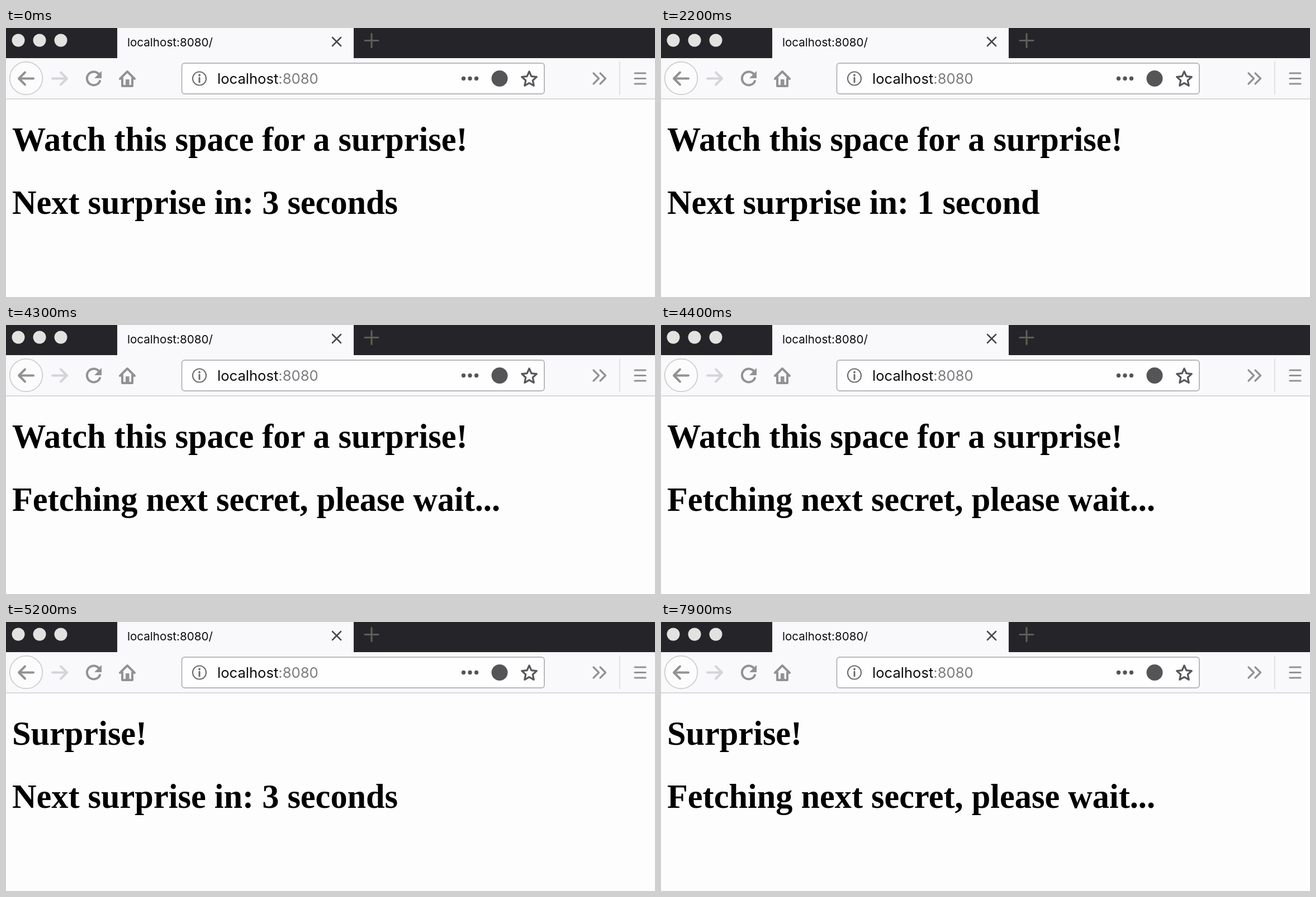
An HTML page for the animation above (8000 ms loop, 1161 px wide and 482 px high).

```html
<!DOCTYPE html>
<html lang="en">
<head>
<meta charset="utf-8">
<title>Surprise countdown</title>
<style>
  html, body { margin: 0; width: 100%; height: 100%; overflow: hidden; background: #fdfdfd; }
  svg { display: block; width: 100%; height: 100%; }
  .ui { font-family: Inter, sans-serif; fill: #0c0c0d; }
  .page { font: bold 60.3px "Liberation Serif", serif; fill: #000; }
  .icon { fill: none; stroke: #929294; stroke-width: 4; stroke-linecap: round; stroke-linejoin: round; }
</style>
</head>
<body>
<svg viewBox="0 0 1161 482">
  <rect width="1161" height="482" fill="#fdfdfd"/>

  <!-- Tab strip -->
  <rect width="1161" height="54" fill="#242429"/>
  <g fill="#e2e2e1">
    <circle cx="22" cy="22" r="11.5"/>
    <circle cx="60" cy="22" r="11.5"/>
    <circle cx="98" cy="22" r="11.5"/>
  </g>
  <rect x="199" width="423" height="54" fill="#f9f9fb"/>
  <rect id="burst" x="200" width="0" height="54" fill="#e5ecfb"/>
  <text class="ui" x="217" y="33" font-size="20.6">localhost:8080/</text>
  <path class="icon" d="M584 17l15 15m0-15l-15 15" style="stroke:#48484c;stroke-width:2.6"/>
  <path class="icon" d="M642 22.5h24M654 10.5v24" style="stroke:#5f5f59;stroke-width:3.2"/>

  <!-- Toolbar -->
  <rect y="54" width="1161" height="72" fill="#f9f9fb"/>
  <rect y="126" width="1161" height="2" fill="#d8d8dd"/>
  <circle cx="36" cy="90" r="29.3" fill="#fcfcfc" stroke="#c8c8c8" stroke-width="1.6"/>
  <path class="icon" d="M49 90.5H23m11-11L23 90.5l11 11"/>
  <path class="icon" d="M83 90.5h26m-11-11l11 11l-11 11" style="stroke:#d4d4d9"/>
  <path class="icon" d="M167 84A12 12 0 1 0 168 95"/>
  <path d="M171 77v13h-13z" fill="#929294"/>
  <path class="icon" d="M204 91l13-13l13 13M208 90v14h18V90"/>
  <rect x="214" y="92" width="6.5" height="10" fill="#929294"/>

  <!-- Address bar -->
  <rect x="314.5" y="63" width="648.5" height="55" rx="5" fill="#fefefe" stroke="#b9b9bd" stroke-width="2"/>
  <circle cx="346" cy="90.5" r="12" fill="none" stroke="#6c6c6e" stroke-width="2.2"/>
  <path d="M346 89v8" stroke="#6c6c6e" stroke-width="3" stroke-linecap="round"/>
  <circle cx="346" cy="84.5" r="1.9" fill="#6c6c6e"/>
  <text class="ui" x="378" y="100" font-size="25.6">localhost<tspan fill="#7c7c80">:8080</tspan></text>
  <g fill="#555558">
    <circle cx="818.5" cy="90.5" r="3.7"/>
    <circle cx="830" cy="90.5" r="3.7"/>
    <circle cx="841.5" cy="90.5" r="3.7"/>
    <circle cx="883" cy="90.5" r="14.5"/>
  </g>
  <path id="star" class="icon" style="stroke:#56565c;stroke-width:3.2"/>
  <path class="icon" d="M1051 81l9.5 9.5l-9.5 9.5m12-19l9.5 9.5l-9.5 9.5" style="stroke-width:3.2"/>
  <rect x="1097" y="60" width="1.6" height="60" fill="#dcdce0"/>
  <path class="icon" d="M1125 81h19m-19 9.5h19m-19 9.5h19" style="stroke-width:3.2"/>

  <!-- Page -->
  <text id="headline" class="page" x="11" y="219.5"></text>
  <text id="status" class="page" x="11" y="332.5"></text>
</svg>
<script>
const LOOP = 8000, STEP = 100, RELOAD = 4500;
const FETCHING = "Fetching next secret, please wait...";
const [burst, star, headline, status_] =
  ["burst", "star", "headline", "status"].map(id => document.getElementById(id));
const clamp = v => Math.max(0, Math.min(1, v));

const starPoints = Array.from({ length: 10 }, (_, i) => {
  const radius = i % 2 ? 6.6 : 14, angle = i * Math.PI / 5;
  return [936 + radius * Math.sin(angle), 92 - radius * Math.cos(angle)];
});
star.setAttribute("d", "M" + starPoints.join("L") + "Z");

const countdown = n => n > 0 ? `Next surprise in: ${n} second${n > 1 ? "s" : ""}` : FETCHING;

function setText(node, text) {
  if (node.textContent !== text) node.textContent = text;
}

function draw(time) {
  const t = Math.floor(time % LOOP / STEP) * STEP;
  const reloaded = t >= RELOAD;
  // The first countdown is already 400 ms into its opening second.
  const elapsed = reloaded ? t - RELOAD : t + 400;
  setText(headline, reloaded ? "Surprise!" : "Watch this space for a surprise!");
  setText(status_, countdown(3 - Math.floor(elapsed / 1000)));

  // Load highlight sweeps across the tab, then fades.
  burst.setAttribute("width", 368 * clamp((t - RELOAD + 100) / 200));
  burst.setAttribute("opacity", 1 - clamp((t - RELOAD - 100) / 300));
}

function tick() {
  draw(performance.now());
  requestAnimationFrame(tick);
}
tick();
</script>
</body>
</html>
```
